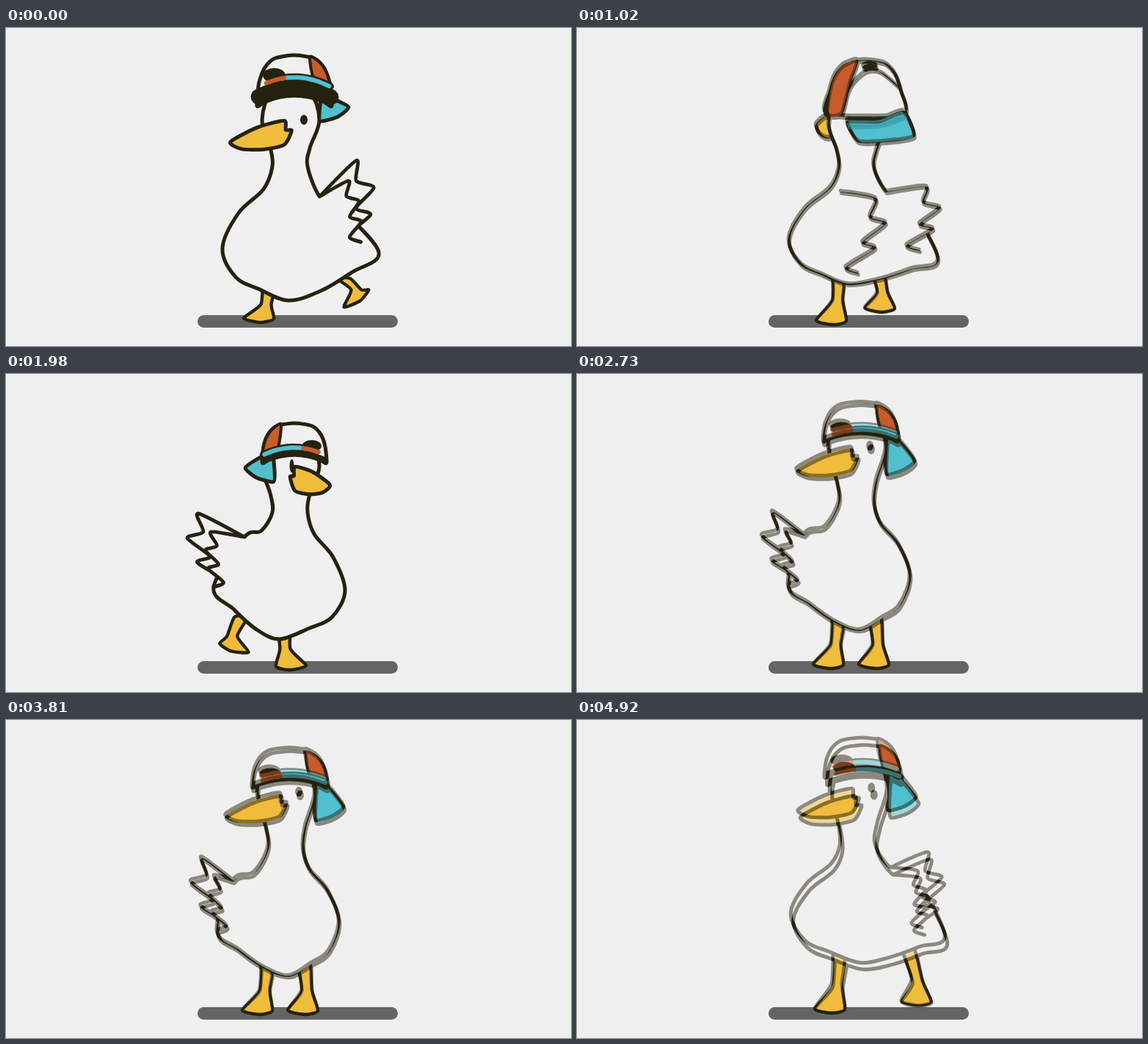
Recreate the animation shown at these times as an HTML page with a canvas. Size 770 by 433 pixels, loop 4950 ms.

```html
<!DOCTYPE html>
<html lang="en">
<head>
<meta charset="utf-8">
<title>Dancing duck</title>
<style>
html, body { margin: 0; width: 100%; height: 100%; overflow: hidden; background: #efefef; }
canvas { display: block; width: 770px; height: 433px; }
</style>
</head>
<body>
<canvas id="stage" width="770" height="433"></canvas>
<script>
const W = 770, H = 433, LOOP = 4950, TICK = 30, BEAT = 495;
const INK = '#262210', WHITE = '#f0f0f0', YELLOW = '#f0bc3c', TEAL = '#50c0cf', ORANGE = '#c85b2a';

const clamp = (v, a = 0, b = 1) => Math.max(a, Math.min(b, v));
const smooth = u => u * u * (3 - 2 * u);
const lerp = (a, b, u) => Array.isArray(a) ? a.map((v, i) => lerp(v, b[i], u)) : a + (b - a) * u;
const mix = (a, b, u, v) => [lerp(a[0], b[0], u), lerp(a[1], b[1], v)];
const shift = ([x, y], dx, dy = 0) => [x + dx, y + dy];
const rad = deg => deg * Math.PI / 180;
const range = (n, f) => Array.from({ length: n }, (_, i) => f(i));

// One half of the body, from neck to belly: the chest side or the tail side
const chestHalf = (p, neck) => [neck, mix(neck, p.chest, .18, .28), mix(neck, p.chest, .68, .57),
  p.chest, mix(p.chest, p.belly, .2, .55), mix(p.chest, p.belly, .55, .78)];
const tailHalf = (p, neck) => [neck, mix(neck, p.saddle, .4, .75), p.saddle,
  p.rump, mix(p.rump, p.belly, .3, .42), mix(p.rump, p.belly, .64, .8)];

function outline(p) {
  const { head, belly, side } = p, neck = [head[0] - 1, head[1] * .5 + 126];
  const half = s => {
    const n = shift(neck, s * 24), cheek = shift(head, s * 39);
    return [shift(head, s * 24, -38), cheek, mix(cheek, n, .8, .6),
      ...(s === side ? tailHalf : chestHalf)(p, n)];
  };
  return [...half(-1), belly, ...half(1).reverse()];
}

// face: 1 looks left, negative looks right; side: 1 = tail on the right; feet: x, y, tilt
const rest = {
  face: 1, side: 1, rise: 60, band: 7, drop: 26, ghost: 0, feather: 22,
  feet: [[350, 398, 0], [412, 398, 0]]
};
const poses = {
  step: { head: [388, 125], chest: [295, 300], belly: [385, 371], saddle: [452, 243], rump: [508, 305],
    tail: [502, 194], feet: [[352, 398, 0], [485, 366, -36]], rise: 88, band: 22, drop: 2 },
  back: { head: [382, 130], chest: [289, 288], belly: [370, 349], saddle: [447, 234], rump: [492, 314],
    tail: [501, 227], feet: [[354, 401, 0], [420, 384, 0]], rise: 86, ghost: 4, rear: true,
    wing: [[385, 234], [432, 243], [408, 345]] },
  right: { head: [388, 125], chest: [462, 295], belly: [372, 361], saddle: [325, 222], rump: [283, 290],
    tail: [262, 190], feet: [[303, 373, 18], [381, 400, 0]], face: -.65, side: -1, rise: 58, drop: 7 },
  left: { head: [382, 100], chest: [454, 275], belly: [385, 349], saddle: [310, 220], rump: [288, 288],
    tail: [267, 188], side: -1, ghost: 5 },
  sway: { head: [387, 124], chest: [297, 305], belly: [395, 369], saddle: [462, 239], rump: [497, 322],
    tail: [500, 199], feet: [[348, 399, 0], [406, 399, 0]], rise: 65, ghost: 4 },
  twist: { head: [384, 95], chest: [301, 280], belly: [388, 349], saddle: [447, 222], rump: [468, 300],
    tail: [472, 222], ghost: 8, feather: 6 },
  hop: { head: [385, 97], chest: [293, 268], belly: [388, 335], saddle: [460, 216], rump: [503, 298],
    tail: [511, 195], feet: [[352, 396, 0], [470, 386, 0]], rise: 68, ghost: 10 }
};
for (const name in poses) {
  const p = poses[name] = { ...rest, ...poses[name] };
  p.body = outline(p);
}
const MORPHS = ['body', 'head', 'belly', 'feet', 'face', 'rise', 'band', 'drop', 'ghost'];

const keys = [[0, 'step'], [1020, 'back'], [1980, 'right'], [2730, 'left'],
  [3390, 'sway'], [3810, 'left'], [4230, 'twist'], [4920, 'hop'], [LOOP, 'hop']];

const beatLift = t => {
  const size = 24 + 24 * Math.exp(-(((t - 1850) / 500) ** 2));
  return size * (1 - Math.cos(2 * Math.PI * t / BEAT)) / 2;
};

function poseAt(t) {
  const i = keys.findLastIndex(k => t >= k[0]);
  const [t0, n0] = keys[i], [t1, n1] = keys[i + 1];
  const a = poses[n0], b = poses[n1], raw = (t - t0) / (t1 - t0);
  const u = smooth(i < 3 ? clamp((raw - .25) / .5) : raw);
  const now = { near: u < .5 ? a : b };
  MORPHS.forEach(k => now[k] = lerp(a[k], b[k], u));
  now.fold = a.side === b.side ? 1 : Math.abs(1 - 2 * u);
  now.lift = beatLift(t) - lerp(beatLift(t0), beatLift(t1), u);
  const walk = i < 3 || i === 6 ? 16 * Math.sin(Math.PI * raw) : 0;
  now.stride = walk * Math.sin(Math.PI * t / BEAT);
  now.stretch = 34 * Math.exp(-(((t - 560) / 130) ** 2));
  return now;
}

// Zigzag of three feathers from a tip down to the body
function fan(from, top, end, side, depth, bulge) {
  const at = (v, inset) => shift(lerp(top, end, v), side * (bulge * Math.sin(Math.PI * v ** .7) - inset));
  return [from, ...range(3, i => [at(i / 3, 0), at((i + .75) / 3, depth)]).flat(), end];
}

function feathers({ saddle, tail, rump, side, feather, wing }) {
  const inner = shift(lerp(tail, rump, .25), -side * 12);
  return [fan(saddle, tail, rump, side, feather, feather),
    wing ? fan(...wing, side, 22, 22) : fan(saddle, inner, rump, side, feather * .7, feather * .4)];
}

function legShape([x, y, tilt], belly, face) {
  const hip = [lerp(x, belly[0], .25), belly[1] - 30], ankle = mix([x, y], hip, .3, .38);
  const dir = face < 0 ? -1 : 1, c = Math.cos(rad(tilt)), s = Math.sin(rad(tilt));
  const sole = (dx, dy) => [x + dir * dx * c - dy * s, y + dir * dx * s + dy * c];
  return [shift(hip, -9 * dir), shift(ankle, -7 * dir), sole(-28, -3), sole(-5, 3), sole(13, -2),
    shift(ankle, 7 * dir), shift(hip, 9 * dir)];
}

function beakShape(base, tip, half) {
  const at = (u, w) => shift(lerp(tip, base, u), 0, w * half);
  return [tip, at(.5, -.85), at(1, -1.05), at(1.03, -.25), at(1.14, -.1), at(1, 1), at(.6, 1.1), at(.2, .75)];
}

// Cap space: u runs -1..1 across, v runs 0..1 down
const dome = deg => {
  const c = Math.cos(rad(deg)), s = Math.max(0, Math.sin(rad(deg)));
  return [Math.sign(c) * Math.abs(c) ** .65, 1 - s ** .85];
};
const arc = (from, to, n) => range(n, i => dome(lerp(from, to, i / (n - 1))));
const rim = (from, to, v) => range(5, i => {
  const u = lerp(from, to, i / 4);
  return [u, v - .2 * (1 - u * u)];
});
const ring = (u, v, ru, rv) => range(8, i => [u + ru * Math.cos(rad(i * 45)), v + rv * Math.sin(rad(i * 45))]);

function draw(g, pose, part) {
  const { near, head, lift, stretch, face, band } = pose;
  const dx = part * pose.ghost * .35, dy = part * pose.ghost;
  const place = ([x, y]) => {
    const w = clamp((398 - y) / 70);
    const out = y > 180 && y < 320 ? stretch * clamp((x - 440) / 90) : 0;
    return [x + out + dx * w, y + (dy - lift) * w];
  };
  const trace = (pts, k, closed) => {
    const q = pts.map(place), n = q.length;
    const at = i => closed ? q[(i + n) % n] : q[clamp(i, 0, n - 1)];
    g.beginPath();
    g.moveTo(...q[0]);
    for (let i = 0; i < (closed ? n : n - 1); i++) {
      const [p, a, b, c] = [at(i - 1), at(i), at(i + 1), at(i + 2)];
      g.bezierCurveTo(a[0] + (b[0] - p[0]) * k, a[1] + (b[1] - p[1]) * k,
        b[0] - (c[0] - a[0]) * k, b[1] - (c[1] - a[1]) * k, b[0], b[1]);
    }
    if (closed) g.closePath();
  };
  const stroke = (color, width) => {
    g.strokeStyle = color;
    g.lineWidth = width;
    g.stroke();
  };
  const shape = (pts, fill, k = .12, width = 5) => {
    trace(pts, k, true);
    g.fillStyle = fill;
    g.fill();
    stroke(INK, width);
  };
  const line = (pts, color, width, k = .16) => {
    trace(pts, k, false);
    stroke(color, width);
  };

  g.fillStyle = '#efefef';
  g.fillRect(0, 0, W, H);
  g.lineJoin = g.lineCap = 'round';
  g.fillStyle = '#646464';
  g.beginPath();
  g.roundRect(261, 391, 273, 17, 8.5);
  g.fill();

  for (const i of [1, 0]) {
    const [x, y, tilt] = pose.feet[i], up = Math.max(0, i ? pose.stride : -pose.stride);
    shape(legShape([x, y - up, tilt], pose.belly, face), YELLOW, .1, 4.4);
  }
  if (near.rear) shape(beakShape(shift(head, -36, 5), shift(head, -56, 2), 14), YELLOW);
  shape(pose.body, WHITE, 1 / 6);

  // The tail hangs on the saddle and folds towards it in a turn
  const [bx, by] = pose.body[near.side > 0 ? 14 : 5], [sx, sy] = near.saddle;
  for (const feather of feathers(near)) {
    const pts = feather.map(([x, y]) => [bx + (x - sx) * pose.fold, by + y - sy]);
    trace([...pts, [390, 290]], .08, false);
    g.fillStyle = WHITE;
    g.fill();
    line(pts, INK, 4.8, .13);
  }

  const flip = face < 0 ? -1 : 1, wide = 51 * flip * clamp(Math.abs(face), .25) ** .35;
  const tall = near.rear ? 74 : 47 + band, top = head[1] - pose.rise, cx = head[0] + (near.rear ? 11 : 5);
  const cap = pts => pts.map(([u, v]) => [cx + u * wide, top + v * tall]);

  if (near.rear) {
    shape(cap(arc(180, 0, 9)), WHITE);
    shape(cap([...arc(180, 95, 5), [-.42, .45], [-.62, .98]]), ORANGE, .14, 4);
    line(cap([[-.6, .95], [-.4, .5], [0, .22], [.4, .22], [.9, .5]]), INK, 4);
    shape(cap(ring(.12, .12, .2, .07)), INK, .16, 2);
    const bill = cap([[-.48, 1.11], [.35, 1.1], [1.02, .94], [1.3, 1.41], [.55, 1.5], [-.18, 1.5]]);
    shape(bill, TEAL, .1);
    line(bill.slice(0, 3).map(p => shift(p, 2, 7)), '#37919b', 5);
    return;
  }

  const edge = cap([[1, 1]])[0], low = pose.drop + 19;
  const bill = [[-13, -14], [6, lerp(-14, pose.drop, .4)], [23, pose.drop], [8, low - 6], [-15, low], [-17, low / 2]];
  const strap = 1 - (band + 3) / tall;
  shape(bill.map(([x, y]) => shift(edge, x * flip, y)), TEAL, .1);
  shape(cap([...arc(180, 0, 9), ...rim(.8, -.8, 1)]), WHITE);
  shape(cap([...arc(75, 20, 4), ...rim(.95, .55, strap).slice(0, 1), [.52, strap - .18]]), ORANGE, .12, 4);
  line(cap(rim(-.95, .97, 1 - band / 2 / tall)), INK, band);
  shape(cap(ring(-.54, strap - .24, .28, .13)), INK, .16, 2);
  line(cap(rim(-.2, .95, strap)), INK, 11);
  line(cap(rim(-.2, .93, strap)), TEAL, 6);
  line(cap(rim(-.75, -.28, strap)), ORANGE, 6);

  const base = shift(head, -9 * face, 18);
  shape(beakShape(base, shift(base, -73 * face, 12 * Math.abs(face)), 16), YELLOW);
  g.fillStyle = INK;
  g.beginPath();
  g.ellipse(...place(shift(head, 8 + 10 * face)), 3.8 + 1.2 * face, 8.2 - 1.4 * face, 0, 0, 2 * Math.PI);
  g.fill();
}

const main = document.getElementById('stage').getContext('2d');
const layer = document.createElement('canvas');
layer.width = W;
layer.height = H;
const extra = layer.getContext('2d');

function frame() {
  const t = Math.floor(performance.now() % LOOP / TICK) * TICK;
  const pose = poseAt(t);
  // Two half-strength exposures make the soft double outline
  draw(main, pose, -.5);
  draw(extra, pose, .5);
  main.globalAlpha = .5;
  main.drawImage(layer, 0, 0);
  main.globalAlpha = 1;
  requestAnimationFrame(frame);
}
frame();
</script>
</body>
</html>
```
